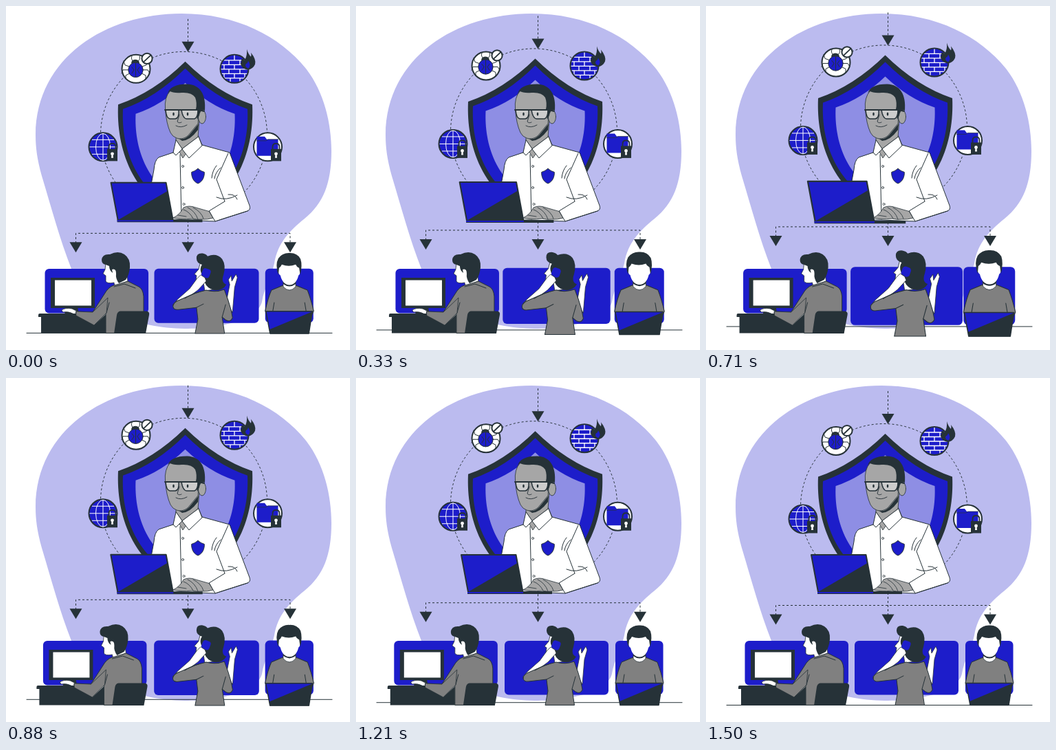
Animation of 500x500 px, one loop 1540 ms. Source, as an HTML page:

```html
<!DOCTYPE html>
<html lang="en">
<head>
<meta charset="utf-8">
<title>Security team</title>
<style>
  html, body { margin: 0; height: 100%; overflow: hidden; background: #fff; }
  svg { display: block; width: 100vw; height: 100vh; }
  .dark { fill: #263238; }
  .blue { fill: #1d1dca; }
  .pale { fill: #8e8ee4; }
  .white { fill: #fff; }
  .skin { fill: #a6a6a6; }
  .grey { fill: #808080; }
  .line { fill: none; }
  .ink { stroke: #263238; stroke-linecap: round; stroke-linejoin: round; }
  .rim { stroke: #263238; stroke-width: 2; }
  .dash { fill: none; stroke: #263238; stroke-dasharray: 3 3; }
  .grid { fill: none; stroke: #fff; }
</style>
</head>
<body>
<svg viewBox="0 0 500 500">
  <defs>
    <clipPath id="wallClip"><circle cx="332" cy="91.5" r="19.5"/></clipPath>
    <g id="lock">
      <path class="ink line" stroke-width="1.8" d="M-5 1V-3Q-5-8 0-8T5-3V1"/>
      <path class="dark" d="M-7.5 0H7.5V17.5H-7.5Z"/>
      <circle class="white" cy="7" r="2.4"/>
      <path class="white" d="M-.9 7H.9L1.5 13H-1.5Z"/>
    </g>
    <path id="head" class="dark" d="M-9 0H9L0 15Z"/>
  </defs>

  <path fill="#bbbbef" d="M255 11C335 11 398 44 436 91C463 126 473 172 473 211C473 258 461 287 434 309C412 327 395 344 390 374C385 397 375 410 372 430C365 457 310 469 260 469C190 468 122 442 95 382C78 338 67 297 52 247C45 222 43 205 43 187C44 75 145 11 255 11Z"/>

  <g class="float">
    <circle class="dash" cx="258.5" cy="187.5" r="121"/>
    <path class="dash" d="M264.5 19V54M264.5 312V345M101.5 345V330.5H413V345"/>
    <use href="#head" x="264.5" y="52"/>
    <use href="#head" x="101.5" y="343.5"/>
    <use href="#head" x="264.5" y="343.5"/>
    <path class="ink" d="M30 475.5H474"/>
    <g id="shield"></g>

    <!-- bug -->
    <circle class="white rim" cx="189" cy="91.5" r="20.5"/>
    <path class="ink line" d="M179 88L173 86L171 80M178 93H170L168 98M180 98L174 101V106M198 88L204 86L206 82M199 93H206L209 98M197 98L203 101V106M185 81Q181 77 183 73M191 81Q196 78 194 73"/>
    <path class="dark" d="M182 84Q182 78 188 78T194 84Z"/>
    <circle class="blue ink" cx="188.5" cy="93" r="10.7"/>
    <path class="ink line" d="M188.5 83V103M183 89L186 93L183 98M194 89L191 93L194 98"/>
    <circle class="white rim" cx="205" cy="76.5" r="7.6"/>
    <path class="ink" stroke-width="1.8" d="M200.5 81L210 72"/>

    <!-- firewall -->
    <circle class="blue rim" cx="332" cy="91.5" r="20.5"/>
    <path class="grid" stroke-width="1.3" clip-path="url(#wallClip)" d="M311 79H353M311 85.5H353M311 92H353M311 98.5H353M311 105H353M332 71V79M324 79V85.5M340 79V85.5M317 85.5V92M332 85.5V92M347 85.5V92M324 92V98.5M340 92V98.5M317 98.5V105M332 98.5V105M347 98.5V105M326 105V112M340 105V112"/>
    <path class="dark" d="M350 63Q352 70 356 74Q357 71 356 68Q364 78 362 85Q359 92 351 93Q342 91 341 84Q343 81 342 77Q346 77 347 79Q351 72 350 63Z"/>
    <path class="blue" d="M352 80Q357 87 352 91Q346 88 349 84Q351 84 352 80Z"/>

    <!-- globe -->
    <circle class="blue rim" cx="141" cy="205" r="20.5"/>
    <path class="grid" d="M141 185.5V224.5M121.5 205H160.5M125 194.5H157M125 215.5H157"/>
    <ellipse class="grid" cx="141" cy="205" rx="10.5" ry="19.5"/>
    <use href="#lock" x="154.5" y="208"/>

    <!-- folder -->
    <circle class="white rim" cx="380.5" cy="205" r="20.5"/>
    <path class="blue" d="M364.5 190H376L379 194H395.5V218H364.5Z"/>
    <path class="ink line" stroke-width=".7" d="M364.5 196H378L381 194H395.5"/>
    <use href="#lock" x="392.5" y="208"/>
  </g>

  <!-- expert -->
  <path class="white ink" d="M247 200L243 213L222 220Q216 224 215 238L210 265L220 311H255L304 313L351 298Q356 296 354 290L325 213L285 202L279 188Z"/>
  <path class="skin ink" stroke-width=".8" d="M247 184V203L257 221L279 191L281 165Z"/>
  <path class="dark" d="M250 192Q258 196 266 188L280 171L279 180Q268 195 256 196Z"/>
  <ellipse class="skin ink" stroke-width=".8" cx="285" cy="161" rx="5.5" ry="10"/>
  <path class="skin ink" stroke-width=".8" d="M238 124Q230 133 231.500 150Q233 171 239 184Q242 190 248 192Q256 195 264 189L279 171L281 135Q262 114 238 124Z"/>
  <path class="dark" d="M235 127C238 118 247 113.500 263 113.500C283 114 291 130 289 152Q283 149 281 159L278 165L276 150Q278 141 275 133Q270 125 255 126Q243 127 238 123.500Z"/>
  <g class="ink" stroke-width="1.5">
    <path fill="#ccc" d="M232 151H251Q252 163 246 164H238Q233 163 232 151ZM255 151H279Q279 162 274 164H263Q257 164 255 151Z"/>
    <path class="line" stroke-width="2" d="M231 151H280L288 153"/>
  </g>
  <ellipse class="dark" cx="243.5" cy="157" rx="1.3" ry="2.5"/>
  <ellipse class="dark" cx="264" cy="157" rx="1.3" ry="2.5"/>
  <path class="ink line" stroke-width=".9" d="M252 158L249 168Q251 171 255 169M247 174Q254 178 263 173"/>
  <path class="white ink" d="M247 195L243 213L247 217L256 208ZM280 190L285 203L266 221L256 208Z"/>
  <path class="ink line" d="M253 216L255 310M323 214L306 252L318 284M306 278Q320 284 336 275M299 250Q300 239 306 232M303 251Q304 242 312 235M323 274Q333 273 336 281"/>
  <g class="white ink" stroke-width=".8">
    <circle cx="257" cy="233" r="1.5"/><circle cx="257" cy="264" r="1.5"/><circle cx="258.5" cy="288" r="1.5"/>
  </g>
  <g id="badge"></g>

  <g class="pulse" data-center="218.5 285">
    <path class="dark" d="M162 310H285V314H162Z"/>
    <path class="blue ink" stroke-width="2" d="M153 257H232.5L242.5 311H163Z"/>
    <path class="dark" d="M234.5 269L243 311H163Z"/>
    <path class="blue" d="M162 311H243V313H162Z"/>
  </g>
  <path class="skin ink" stroke-width=".8" d="M243 308Q253 303 258 293Q266 289 276 293L297 299L301 308Q292 311 285 310Q278 311 271 309Q253 311 243 308Z"/>
  <path class="ink line" stroke-width=".8" d="M258 296Q267 299 272 309M264 293Q275 298 279 310M272 293Q284 299 287 309M250 304L262 306"/>
  <path class="white" d="M296 298L318 284L340 298L304 313Z"/>
  <path class="ink line" d="M318 284L295 298L304 313L351 298"/>

  <!-- desk worker -->
  <g id="slide">
    <rect class="blue" x="56.5" y="382" width="150.5" height="64.5" rx="6"/>
    <path class="dark" d="M87 437H104L106 449H85ZM65 395H129V439H65Z"/>
    <path class="white" d="M71 398.5H124V435.5H71Z"/>
    <path class="white ink" stroke-width=".8" d="M145 373L144 383L141 389L145 392L145 400Q147 404 157 402L158 408L177 400L174 378Z"/>
    <path class="dark" d="M139 369Q140 360 151 361Q163 355 172 361Q181 367 180 380Q179 391 174 398L164 403Q159 396 160 389Q160 381 154 383L155 388Q150 384 150 378L145 376Q139 375 139 369Z"/>
    <path class="white ink" stroke-width=".8" d="M81 442Q86 438 96 440L106 445L102 450Q92 443 83 445Z"/>
    <path class="grey ink" d="M102 444L126 445L146 414Q152 406 161 405L177 400L193 408Q199 411 200 422V475.5H145V446L128 464L102 450Z"/>
    <path class="ink line" d="M146 446L150 431M157 408L172 404L188 410"/>
    <path class="dark" d="M47 449Q47 447 49 447H102L128 464L145 448V475.5H51V452H47Z"/>
    <path class="grey ink" stroke-width=".8" d="M102 444L126 445L148 424L146 446L128 464L102 450Z"/>
    <path class="dark" d="M166 443.5H204Q209 444 208 449L203 476H157L161 449Q162 444 166 443.5Z"/>
  </g>

  <!-- caller -->
  <g class="pulse" data-center="291.5 418">
    <rect class="blue" x="216" y="382" width="151" height="78.5" rx="6"/>
    <path class="white ink" stroke-width=".8" d="M320 430L325 405L323 398L327 392L328 400L334 390L336 395L332 409L329 445Z"/>
    <path class="white ink" stroke-width=".8" d="M282 375L280 383L274 390L277 392L276 400Q279 404 287 402L289 414L303 412L298 380Z"/>
    <path class="dark" d="M277 367Q277 359 286 360Q291 361 293 364Q306 359 314 368Q320 377 316 391Q312 402 320 405Q314 415 302 413Q292 410 289 402L284 389Q281 382 285 376Q277 374 277 367Z"/>
    <rect class="blue" x="285" y="382" width="12" height="13" rx="4" transform="rotate(20 291 388)"/>
    <path class="white ink" stroke-width=".8" d="M243 434L250 426L267 411L278 396L283 391L289 395L291 400L279 413L264 424L248 438Z"/>
    <path class="grey ink" d="M243 436Q244 430 253 427L276 417L291 413Q304 417 317 412Q323 427 327 442L329 453Q326 460 319 456L314 452L317.5 475.5H275L279 455L277 438L251 441Q243 442 243 436Z"/>
    <path class="ink line" d="M277 438L287 433M314 452L319 434M260 425Q269 419 280 416"/>
  </g>

  <!-- remote worker -->
  <g class="pulse" data-center="411.5 418">
    <rect class="blue" x="377" y="382" width="69.5" height="78" rx="6"/>
    <path class="grey ink" d="M377 443Q381 424 386 413L403 406H421L438 413Q443 426 447 443L440 458H384Z"/>
    <path class="white ink" stroke-width=".8" d="M403 398V408Q412 418 421 408V398Z"/>
    <path class="dark" d="M403 401Q412 410 421 401V404Q412 411 403 404Z"/>
  </g>
  <g class="float"><use href="#head" x="413" y="343.5"/></g>
  <g class="pulse" data-center="411.5 418">
    <path class="white" d="M396 380Q395 390 399 392Q402 405 412 405T425 392Q429 389 427 380L420 372H402Z"/>
    <path class="dark" d="M396 391Q391 376 396 367Q402 359 412 359.5Q423 359 428 368Q431 377 427.5 391L426 381Q422 379 421 376Q411 380 401 376Q399 380 397 381Z"/>
    <path class="ink line" d="M388 443L390 431M436 443L434 431"/>
    <path class="blue ink" stroke-width="1.5" d="M378 443.5H445L440 475.5H384Z"/>
    <path class="dark" d="M445 444L440 476H384L383 470Z"/>
  </g>
</svg>
<script>
  const LOOP = 1540, FRAMES = 37, CYCLE = 1500;
  const $ = id => document.getElementById(id);
  const all = selector => document.querySelectorAll(selector);

  const shieldPath = (cx, w, top, shoulder, bottom) => {
    const bend = top + (shoulder - top) * .72;
    const low = bottom - (bottom - shoulder) * .19;
    const side = shoulder + (bottom - shoulder) * .37;
    return `M${cx} ${top}Q${cx - w * .47} ${bend} ${cx - w} ${shoulder}` +
      `C${cx - w * 1.03} ${side} ${cx - w * .8} ${low} ${cx} ${bottom}` +
      `C${cx + w * .8} ${low} ${cx + w * 1.03} ${side} ${cx + w} ${shoulder}` +
      `Q${cx + w * .47} ${bend} ${cx} ${top}Z`;
  };
  const shield = (name, ...size) => `<path class="${name}" d="${shieldPath(...size)}"/>`;

  $('shield').innerHTML =
    shield('dark', 260.5, 97.5, 81, 143.5, 312) +
    shield('blue', 260.5, 90.5, 91, 150, 302) +
    shield('pale', 260.5, 72, 112, 157, 286);
  $('badge').innerHTML = shield('blue ink', 279, 9.3, 236.5, 241.5, 258);

  // Linear interpolation through [time, value] keys.
  const track = (keys, t) => {
    const i = Math.max(1, keys.findIndex(k => k[0] >= t));
    const [t0, a] = keys[i - 1], [t1, b] = keys[i];
    return a + (b - a) * (t - t0) / (t1 - t0);
  };
  const rise = [[0, 0], [750, -10], [1500, 0]];
  const beat = [[0, 1], [150, 1.1], [450, 1], [600, 1], [750, 1.1], [900, 1], [1500, 1]];
  const sway = [[0, 0], [360, 1], [780, -3], [1500, 0]];

  function draw(now) {
    const step = Math.floor(((now + 4) % LOOP) * FRAMES / LOOP);
    const t = Math.min(step * LOOP / FRAMES + 10, CYCLE);
    const y = track(rise, t), s = track(beat, t);
    all('.float').forEach(g => g.setAttribute('transform', `translate(0 ${y})`));
    all('.pulse').forEach(g => {
      const [cx, cy] = g.dataset.center.split(' ');
      g.setAttribute('transform', `translate(${cx} ${cy}) scale(${s}) translate(${-cx} ${-cy})`);
    });
    $('slide').setAttribute('transform', `translate(${track(sway, t)} 0)`);
  }

  const start = performance.now();
  function tick() {
    draw(performance.now() - start);
    requestAnimationFrame(tick);
  }
  tick();
</script>
</body>
</html>
```
